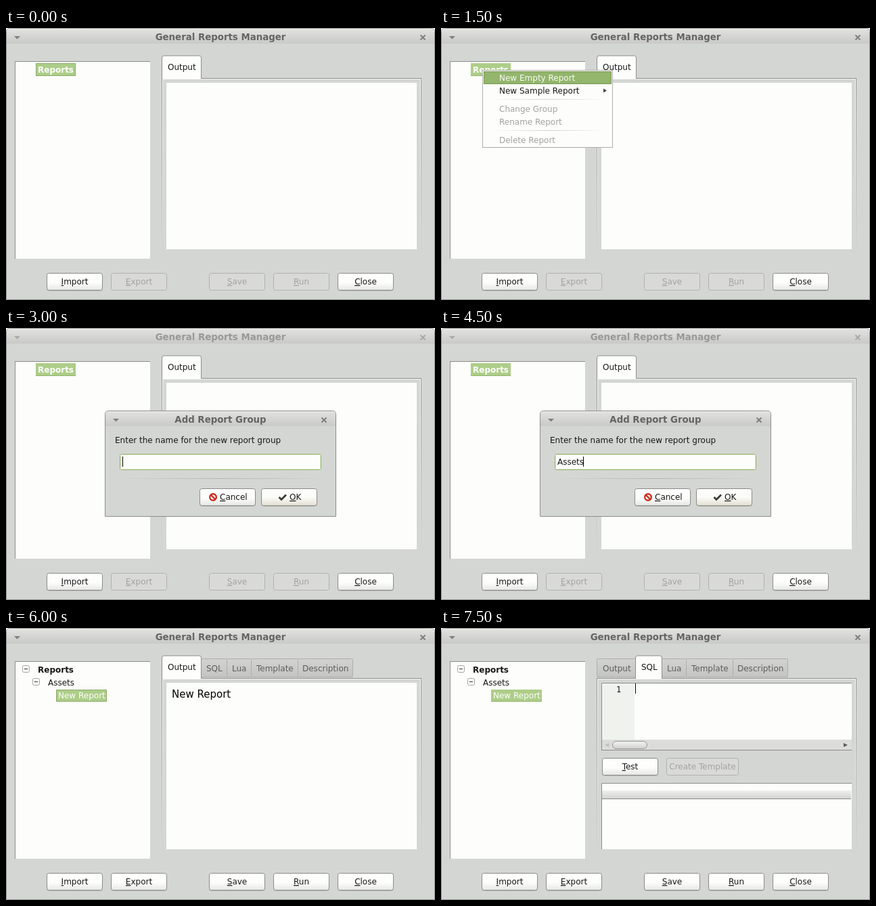
These frames come from a looping animation (634 px wide and 402 px high, 8 s). An HTML page:

```html
<!DOCTYPE html>
<html lang="en">
<head>
<meta charset="utf-8">
<title>General Reports Manager</title>
<style>
  html, body { margin: 0; width: 100%; height: 100%; overflow: hidden; background: #fff; }
  svg { display: block; width: 634px; height: 402px; font: 12px "DejaVu Sans", sans-serif; }
  text { white-space: pre; }
  .b { font-weight: bold; }
  .title { font-weight: bold; font-size: 13.33px; }
  .big { font-size: 15px; }
  .mono { font-family: "DejaVu Sans Mono", monospace; }
  .u { text-decoration: underline; }
</style>
</head>
<body>
<svg viewBox="0 0 634 402">
  <defs>
    <linearGradient id="bar" x2="0" y2="1"><stop stop-color="#e2e2e0"/><stop offset="1" stop-color="#c9cac7"/></linearGradient>
    <linearGradient id="button" x2="0" y2="1"><stop stop-color="#fff"/><stop offset=".55" stop-color="#fdfdfc"/><stop offset="1" stop-color="#e6e7e4"/></linearGradient>
    <linearGradient id="default" x2="0" y2="1"><stop stop-color="#fff"/><stop offset=".5" stop-color="#fbfbf8"/><stop offset="1" stop-color="#e3e0d2"/></linearGradient>
    <linearGradient id="tab" x2="0" y2="1"><stop stop-color="#d2d3d0"/><stop offset="1" stop-color="#c4c5c2"/></linearGradient>
    <linearGradient id="header" x2="0" y2="1"><stop stop-color="#f1f1f0"/><stop offset="1" stop-color="#d3d4d2"/></linearGradient>
    <linearGradient id="thumb" x2="0" y2="1"><stop stop-color="#f4f4f3"/><stop offset="1" stop-color="#cfd0cd"/></linearGradient>
    <linearGradient id="fadeDown" x2="0" y2="1"><stop stop-color="#939491"/><stop offset="1" stop-color="#939491" stop-opacity="0"/></linearGradient>
    <linearGradient id="lightDown" x2="0" y2="1"><stop stop-color="#fff"/><stop offset="1" stop-color="#fff" stop-opacity="0"/></linearGradient>
    <linearGradient id="rule"><stop stop-color="#b4b5b2" stop-opacity="0"/><stop offset=".5" stop-color="#b4b5b2"/><stop offset="1" stop-color="#b4b5b2" stop-opacity="0"/></linearGradient>
  </defs>
  <g id="stage"></g>
</svg>
<script>
const EDGE = '#8d8e8b', PANEL = '#d4d6d3', PAPER = '#fdfefc', INK = '#161616', FADED = '#a2a3a0';

const rect = (x, y, w, h, fill, extra = '') =>
  `<rect x="${x}" y="${y}" width="${w}" height="${h}" fill="${fill}" ${extra}/>`;
const box = (x, y, w, h, fill, stroke = EDGE, r = 0, extra = '') =>
  rect(x + .5, y + .5, w - 1, h - 1, fill, `stroke="${stroke}" rx="${r}" ${extra}`);
const path = (d, fill, extra = '') => `<path d="${d}" fill="${fill}" ${extra}/>`;
const text = (x, y, s, fill = INK, cls = '', anchor = 'start') =>
  `<text x="${x}" y="${y}" fill="${fill}" class="${cls}" text-anchor="${anchor}">${s}</text>`;
const mnemonic = s => `<tspan class="u">${s[0]}</tspan>${s.slice(1)}`;

function frame(x, y, w, h, title, active) {
  const ink = active ? '#646562' : '#989996', mark = active ? '#7f807d' : '#a9aaa7';
  const top = r => `M${x + .5} ${y + h - .5}v${r + 1 - h}q0 ${-r} ${r} ${-r}h${w - 1 - 2 * r}q${r} 0 ${r} ${r}v${h - 1 - r}z`;
  return path(top(5), PANEL, `stroke="${EDGE}"`) +
    path(`M${x + 1} ${y + 23}v-18q0 -4 4 -4h${w - 10}q4 0 4 4v18z`, 'url(#bar)') +
    path(`M${x + 5} ${y + 1.5}h${w - 10}`, 'none', 'stroke="#efefed"') +
    path(`M${x + 12} ${y + 12}h9l-4.5 4.5z`, mark) +
    path(`M${x + w - 21.5} ${y + 10.5}l7 7m0 -7l-7 7`, 'none', `stroke="${mark}" stroke-width="2"`) +
    text(x + w / 2, y + 18, title, ink, 'title', 'middle');
}

function plate(x, y, w, enabled, fill = 'url(#button)') {
  return enabled
    ? box(x, y + 1, w, 26, 'none', '#bbbcb9', 3) + box(x, y, w, 26, fill, '#8a8b88', 3)
    : box(x, y, w, 26, '#d9dad7', '#b1b2af', 3);
}
function button(x, y, label, enabled = true, w = 83) {
  return plate(x, y, w, enabled) +
    text(x + w / 2, y + 17, enabled || w === 83 ? mnemonic(label) : label, enabled ? INK : FADED, '', 'middle');
}

function buttons(reportOpen) {
  return button(60, 362, 'Import') + button(155, 362, 'Export', reportOpen) +
    button(300, 362, 'Save', reportOpen) + button(395, 362, 'Run', reportOpen) + button(490, 362, 'Close');
}

const selection = (x, y, w, h, focused) => rect(x, y, w, h, '#adcd88') + (focused
  ? box(x, y, w, h, 'none', '#6f8b50', 0, 'stroke-dasharray="1 1"')
  : rect(x, y + h - 1, w, 1, '#93b36b'));

const expander = (x, y) => box(x, y, 11, 11, '#fafaf9', '#a4a5a2', 2) + rect(x + 3, y + 5, 5, 1, '#333');

function tree(reportOpen, focused) {
  const pane = rect(13, 49, 200, 292, PAPER) + rect(13, 49, 200, 1, EDGE) + rect(13, 49, 1, 292, EDGE);
  if (!reportOpen) return pane + selection(44, 52, 59, 19, focused) + text(47, 66, 'Reports', '#fff', 'b');
  return pane + expander(24, 55) + text(47, 66, 'Reports', INK, 'b') +
    expander(39, 74) + text(62, 85, 'Assets') +
    selection(74, 91, 75, 18, focused) + text(77, 104, 'New Report', '#fff');
}

// Each tab: label, left edge, right edge, text position.
const TABS = [['Output', 230, 289, 239], ['SQL', 288, 327, 296], ['Lua', 326, 363, 334],
  ['Template', 362, 432, 370], ['Description', 431, 513, 438]];

function notebook(count, active) {
  let s = rect(230, 74, 1, 262, 'url(#fadeDown)') + rect(613, 74, 1, 262, 'url(#fadeDown)') +
    rect(231, 75, 1, 255, 'url(#lightDown)') + rect(612, 75, 1, 255, 'url(#lightDown)');
  TABS.slice(0, count).forEach(([label, l, r, x], i) => {
    if (i !== active) s += box(l, 45, r - l, 28, 'url(#tab)', '#aeafac', 1) + text(x, 64, label, '#5d5e5b');
  });
  s += rect(230, 74, 384, 1, EDGE) + rect(231, 75, 382, 1, '#f6f7f5');
  const [label, l, r, x] = TABS[active], left = active ? l - 1 : l;
  return s + path(`M${left + .5} 75v-31q0 -3 3 -3h${r - left - 7}q3 0 3 3v31`, PAPER, `stroke="${EDGE}"`) +
    text(x, 62, label);
}

const output = () => rect(237, 81, 370, 246, PAPER);

function sqlPage() {
  return rect(237, 81, 370, 100, PAPER) + rect(238, 82, 48, 83, '#f0f2ee') +
    rect(238, 165, 369, 16, '#dcdddb') + box(253, 167, 52, 12, 'url(#thumb)', '#979895', 5.5) +
    path('M248 170v6l-6 -3z', '#c0c1be') + path('M595 170v6l6 -3z', '#5c5d5a') +
    path('M237.5 181v-99.5h369.5M237 180.5h370', 'none', `stroke="${EDGE}"`) +
    text(259, 95, '1', INK, 'mono') + rect(287, 82, 1, 15, '#000') +
    button(238, 192, 'Test') + button(333, 192, 'Create Template', false, 107) +
    rect(237, 229, 370, 98, PAPER) + rect(238, 240, 368, 12, 'url(#header)') +
    rect(237, 252, 369, 1, EDGE) + path('M237.5 327v-97.5h369.5', 'none', `stroke="${EDGE}"`);
}

function menu() {
  const rule = y => rect(74, y, 170, 1, 'url(#rule)', 'opacity=".6"');
  return box(61, 62, 193, 115, PAPER, '#adaeab') + box(63, 64, 189, 19, '#93b56c', '#78994f') +
    text(86, 78, 'New Empty Report', '#f8fbf4') + text(86, 97, 'New Sample Report') +
    path('M240 89.5v6l5 -3z', '#444') + rule(105) +
    text(86, 124, 'Change Group', FADED) + text(86, 143, 'Rename Report', FADED) +
    rule(151) + text(86, 170, 'Delete Report', FADED);
}

function dialog(value) {
  return frame(146, 122, 342, 157, 'Add Report Group', true) +
    text(161, 170, 'Enter the name for the new report group') +
    box(168, 186, 298, 24, PAPER, '#94b56d', 2) + box(169, 187, 296, 22, 'none', '#dfead2', 1) +
    text(172, 202, value) + rect(value ? 210 : 172, 190, 1, 15, '#000') +
    rect(161, 222, 314, 1, 'url(#rule)') +
    plate(286, 237, 83, true) +
    '<circle cx="306" cy="250" r="4.8" fill="#fff" stroke="#cf2a1b" stroke-width="2.4"/>' +
    path('M302.5 246.5l7 7', 'none', 'stroke="#cf2a1b" stroke-width="2.4"') + text(316, 254, mnemonic('Cancel')) +
    plate(377, 237, 83, true, 'url(#default)') +
    path('M403.5 250l3.5 3.5l7 -7', 'none', 'stroke="#3a3b38" stroke-width="2.8"') + text(419, 254, mnemonic('OK'));
}

function scene({ active = true, focused = false, open = false, tab = 0, page = output, overlay = '' }) {
  return frame(0, 0, 634, 402, 'General Reports Manager', active) + tree(open, focused) +
    notebook(open ? 5 : 1, tab) + page() + buttons(open) + overlay;
}

const STEP = 1500, LOOP = 8000;
const scenes = [
  { focused: true },
  { overlay: menu() },
  { active: false, overlay: dialog('') },
  { active: false, overlay: dialog('Assets') },
  { focused: true, open: true, page: () => output() + text(245, 103, 'New Report', '#000', 'big') },
  { open: true, tab: 1, page: sqlPage },
].map(scene);

const stage = document.getElementById('stage');
const start = performance.now();
let shown = -1;
function draw() {
  const index = Math.floor((performance.now() - start) % LOOP / STEP);
  if (index !== shown) stage.innerHTML = scenes[shown = index];
  requestAnimationFrame(draw);
}
draw();
</script>
</body>
</html>
```
